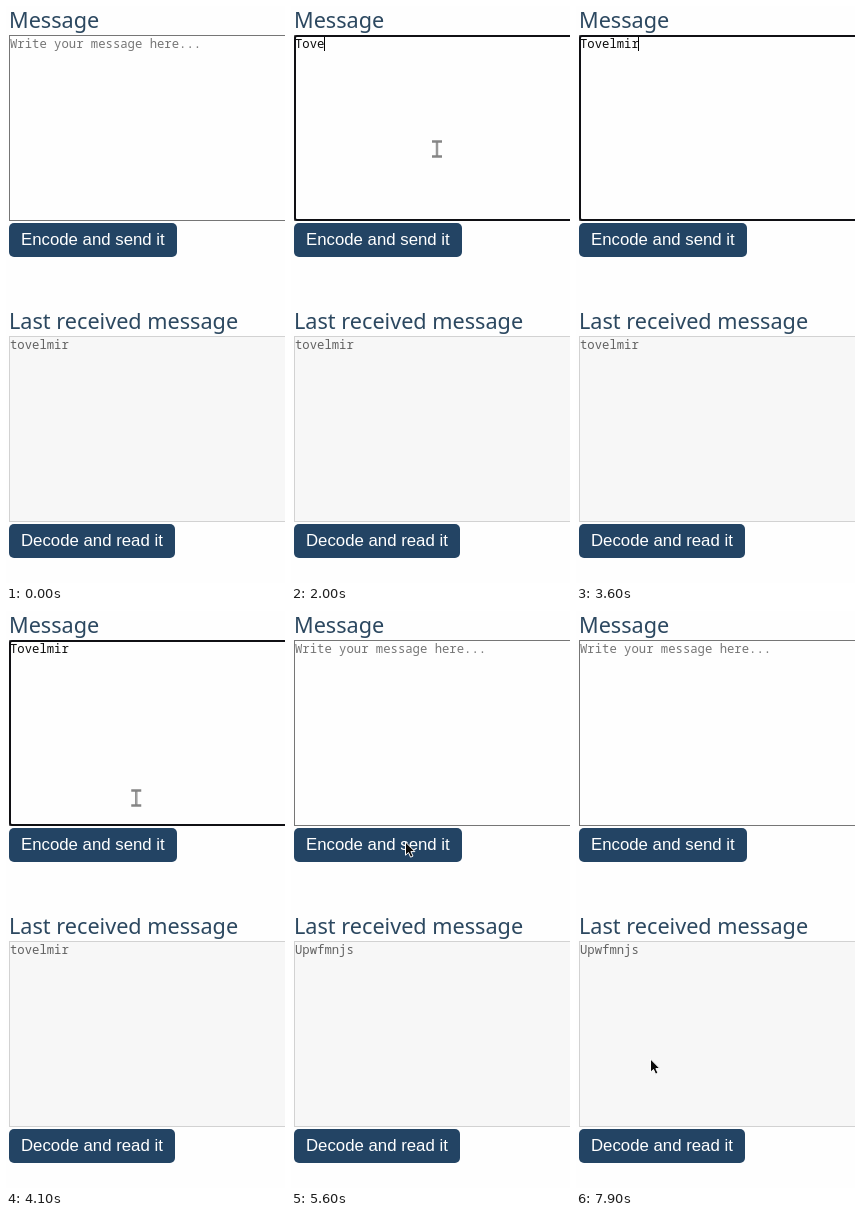
Write an HTML page that moves like this. It is 279 by 577 pixels and loops after 8 s.

```html
<!DOCTYPE html>
<html lang="en">
<head>
<meta charset="utf-8">
<title>Message encoder</title>
<style>
  html, body { margin: 0; width: 100%; height: 100%; overflow: hidden; background: #fefefe; }
  svg { display: block; width: 279px; height: 577px; }
  text { white-space: pre; }
  .title { font: 21.65px "Noto Sans", "Open Sans", sans-serif; fill: #2c4860; }
  .mono { font: 12.25px "Noto Sans Mono", "DejaVu Sans Mono", monospace; }
  .button rect { fill: #234464; }
  .button text { font: 16.8px "Liberation Sans", Arial, sans-serif; fill: #fff; }
</style>
</head>
<body>
<svg viewBox="0 0 279 577">
  <rect width="279" height="577" fill="#fefefe"/>

  <text class="title" x="3" y="22">Message</text>
  <rect x="3.5" y="29.5" width="300" height="185" fill="#fefefe" stroke="#767676"/>
  <text id="input" class="mono" x="4" y="42"></text>
  <rect id="caret" y="31" width="1" height="14"/>
  <rect id="focus" x="4" y="30" width="300" height="184" rx="2" fill="none" stroke="#101014" stroke-width="2"/>
  <g class="button">
    <rect x="3" y="217" width="168" height="34" rx="5"/>
    <text x="15" y="239">Encode and send it</text>
  </g>

  <g transform="translate(0 301)">
    <text class="title" x="3" y="22">Last received message</text>
    <rect x="3.5" y="29.5" width="300" height="185" fill="#f7f7f7" stroke="#d2d2d2"/>
    <text id="received" class="mono" x="4" y="42" fill="#626262"></text>
    <g class="button">
      <rect x="3" y="217" width="166" height="34" rx="5"/>
      <text x="15" y="239">Decode and read it</text>
    </g>
  </g>

  <g id="beam" fill="none">
    <path d="M-5-7.5H5M-5 7.5H5M0-7.5V7.5" stroke="#858585" stroke-width="2.4"/>
    <path d="M0-6V6" stroke="#b4b4b4" stroke-width=".8"/>
  </g>
  <path id="arrow" d="M0 0V13.2L3 10.5 5.1 15.2 7.5 14.1 5.4 9.6H9.4Z" fill="#0c0c0c" stroke="#fff" stroke-width="1"/>
</svg>
<script>
const LOOP = 8000;
const STEP = 100;
const CHAR_WIDTH = 7.35;
const NAME = "Tovelmir";
const KEY_TIMES = [1500, 1700, 1800, 2000, 2100, 2300, 2400, 2500];
const FOCUS = 700, BLUR = 5500, SENT = 5600;

// Each move: start, end, from point, to point
const MOVES = [
  [0, 600, [290, 176], [146, 143]],
  [3700, 4500, [146, 143], [114.5, 231]],
  [7500, 7900, [114.5, 231], [74.5, 448]]
];

const $ = id => document.getElementById(id);
const show = (el, on) => el.setAttribute("visibility", on ? "visible" : "hidden");
const between = (t, a, b) => t >= a && t < b;
const ease = p => p * p * (3 - 2 * p);
const shift = word => [...word].map(c => String.fromCharCode(c.charCodeAt(0) + 1)).join("");

function pointerAt(t) {
  const [start, end, from, to] = MOVES.filter(m => t >= m[0]).pop();
  const p = ease(Math.min(1, (t - start) / (end - start)));
  return from.map((v, i) => v + (to[i] - v) * p);
}

function drawPointer(t) {
  const [x, y] = pointerAt(t);
  const visible = t > 0 && !between(t, 2700, 3800);
  const overInput = y < 215;
  show($("beam"), visible && overInput);
  show($("arrow"), visible && !overInput);
  for (const id of ["beam", "arrow"]) $(id).setAttribute("transform", `translate(${x} ${y})`);
}

function render(t) {
  const count = t < SENT ? KEY_TIMES.filter(k => t >= k).length : 0;
  const focused = between(t, FOCUS, BLUR);
  const blinkedOff = between(t, 3100, 3600) || between(t, 4100, 4600) || t >= 5200;

  $("input").textContent = count ? NAME.slice(0, count) : "Write your message here...";
  $("input").setAttribute("fill", count ? "#0c0c0c" : "#757575");
  $("caret").setAttribute("x", 4 + Math.floor(count * CHAR_WIDTH));
  show($("caret"), focused && !blinkedOff);
  show($("focus"), focused);
  $("received").textContent = t < SENT ? NAME.toLowerCase() : shift(NAME);
  drawPointer(t);
}

const origin = performance.now();
function tick() {
  const t = (performance.now() - origin) % LOOP;
  render(Math.floor(t / STEP) * STEP);
  requestAnimationFrame(tick);
}
tick();
</script>
</body>
</html>
```
